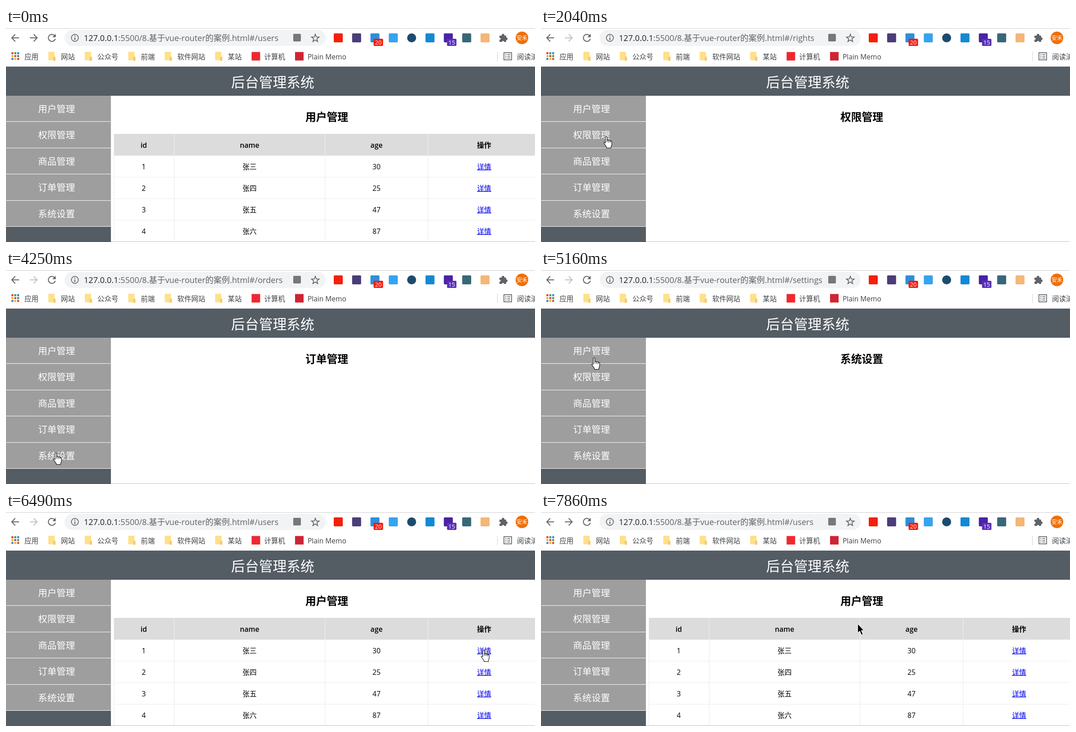
Recreate the animation shown at these times as an HTML page. Size 1175 px wide and 477 px high, loop 8 s.

```html
<!DOCTYPE html>
<html lang="zh-CN">
<head>
<meta charset="utf-8">
<title>后台管理系统</title>
<style>
  html, body { margin: 0; width: 100%; height: 100%; overflow: hidden; background: #fff; }
  svg { display: block; font-family: "Open Sans", "Noto Sans CJK SC", "Noto Sans CJK", sans-serif; }
  .mid { text-anchor: middle; }
  .ui { fill: none; stroke: #5f6368; stroke-width: 2; }
  .thin { stroke-width: 1.7; }
</style>
</head>
<body>
<svg id="stage" width="1175" height="477" viewBox="0 0 1175 477"></svg>
<script>
const LOOP = 8000, STEP = 70;
const menu = [['users', '用户管理'], ['rights', '权限管理'], ['goods', '商品管理'],
              ['orders', '订单管理'], ['settings', '系统设置']];

const rect = (x, y, w, h, fill, more = '') =>
  `<rect x="${x}" y="${y}" width="${w}" height="${h}" fill="${fill}" ${more}/>`;
const disc = (x, y, r, more) => `<circle cx="${x}" cy="${y}" r="${r}" ${more}/>`;
const text = (x, y, size, fill, str, more = '') =>
  `<text x="${x}" y="${y}" font-size="${size}" fill="${fill}" ${more}>${str}</text>`;
const mid = (x, y, size, fill, str, more = '') =>
  text(x, y, size, fill, str, `class="mid" ${more}`);
const path = (d, more = 'class="ui"') => `<path d="${d}" ${more}/>`;
const each = (n, fn) => Array.from({ length: n }, (_, i) => fn(i)).join('');

function starPath(cx, cy, outer, inner) {
  return 'M' + Array.from({ length: 10 }, (_, i) => {
    const r = i % 2 ? inner : outer, a = i * Math.PI / 5;
    return `${cx + r * Math.sin(a)} ${cy - r * Math.cos(a)}`;
  }).join('L') + 'Z';
}

function addressBar() {
  const back = path('M29 22H13M20.5 14L12.8 22L20.5 30');
  return rect(0, 0, 1175, 1, '#c8c8c8') + back +
    `<g id="forward" transform="matrix(-1 0 0 1 82 0)">${back}</g>` +
    path('M107.5 16.5A7.8 7.8 0 1 0 109.5 24') + path('M110.5 13V20.5H103Z', 'fill="#5f6368"') +
    rect(130, 4, 580, 36, '#f1f3f4', 'rx="18"') +
    disc(153, 22, 7.8, 'class="ui thin"') + path('M153 17v2M153 21v6') +
    text(173, 28.5, 18.1, '#5f6368', '<tspan fill="#202124">127.0.0.1</tspan>' +
      ':5500/8.基于vue-router的案例.html#/<tspan id="route"></tspan>') +
    rect(638, 13, 17, 17, '#75797d', 'rx="2"') +
    path(starPath(687, 23, 9, 3.8), 'class="ui thin"');
}

function extensions() {
  const colors = ['#f3200d', '#4b3c7a', '#2c8fda', '#36a3f0', '#1b4c6d',
                  '#1389d3', '#4a22a5', '#386878', '#f4b777'];
  const cx = i => 738 + i * 40.75;
  const badge = (i, fill, str) =>
    rect(cx(i) - 3, 24, 21, 16, fill, 'rx="2"') + mid(cx(i) + 7.5, 37, 13, '#fff', str);
  return colors.map((c, i) => rect(cx(i) - 10, 12, 20, 20, c, `rx="${i === 4 ? 10 : 2}"`)).join('') +
    badge(2, '#f31a0d', '20') + badge(6, '#5a30b8', '15') +
    rect(1096, 17, 15, 14, '#5f6368', 'rx="1"') + disc(1104, 16, 3, 'fill="#5f6368"') +
    disc(1111, 24, 3, 'fill="#5f6368"') + disc(1096.5, 24, 2.3, 'fill="#fff"') +
    disc(1104, 31, 2.3, 'fill="#fff"') +
    disc(1146, 22, 14, 'fill="#ee7009"') + mid(1146, 26.5, 12, '#fff', '安禾');
}

function bookmarks() {
  const size = 15.5, colors = ['#e34234', '#3b9d59', '#3f7fe8', '#eab51d'];
  const apps = x => each(9, i => rect(x - 1 + i % 3 * 6.4, 54 + (i / 3 | 0) * 6.4, 4.4, 4.4, colors[i % 4]));
  const folder = x => rect(x, 53, 14, 19, '#ffe08a', 'rx="1"') + rect(x + 11, 64, 5, 9, '#f5cc62', 'rx="1"');
  const block = fill => x => rect(x, 53.5, 19, 19, fill);
  const items = [['应用', apps], ['网站', folder], ['公众号', folder], ['前端', folder],
                 ['软件网站', folder], ['某站', folder], ['计算机', block('#ee2831')],
                 ['Plain Memo', block('#cf2434')]];
  let x = 13, s = '';
  for (const [label, icon] of items) {
    s += icon(x) + text(x + 28, 69.7, size, '#3c4043', label);
    x += 50 + size * label.length;
  }
  return s + rect(1091, 53, 1, 21, '#cdd0d4') + text(1135, 69.7, size, '#3c4043', '阅读清单') +
    rect(1106, 55, 17, 16, 'none', 'class="ui thin"') +
    each(3, i => path(`M1109 ${59 + i * 4}h2.5m2 0h6.5`, 'class="ui thin"'));
}

function layout() {
  const edge = i => Math.floor(150 + i * 58.5);
  return rect(0, 86, 1175, 65, '#545c64') + mid(592.5, 132, 30.8, '#fff', '后台管理系统') +
    rect(0, 151, 233, 326, '#545c64') +
    menu.map(([, name], i) =>
      rect(0, edge(i) + 1, 233, edge(i + 1) - edge(i) - 1, '#9e9e9e') +
      rect(0, edge(i + 1), 233, 1, '#fff') +
      mid(112.3, 187.5 + i * 58.6, 20.5, '#fff', name)).join('') +
    rect(233, 476, 942, 1, '#b9b9b9');
}

function table() {
  const cols = [306, 541, 823, 1062], size = 15.7;
  const rows = [[1, '张三', 30], [2, '张四', 25], [3, '张五', 47], [4, '张六', 87]];
  return rect(239, 236, 936, 48, '#dcdcdc') +
    each(4, i => rect(239, 284 + i * 48, 936, 1, '#ebebeb')) +
    [239, 373, 708, 937].map(x => rect(x, 236, 1.3, 240, '#ededed')).join('') +
    ['id', 'name', 'age', '操作'].map((str, i) =>
      mid(cols[i], 266.5, size, '#000', str, 'font-weight="600"')).join('') +
    rows.map((row, r) => [...row, '详情'].map((str, i) =>
      mid(cols[i], 314.5 + r * 48, size, i < 3 ? '#000' : '#0000ee', str,
        i < 3 ? '' : 'text-decoration="underline"')).join('')).join('');
}

function details() {
  return mid(712.5, 203, 18, '#000', '用户详情页--id:1---1', 'font-weight="700"') +
    rect(671.5, 235.5, 83, 38, '#ecf5ff', 'stroke="#8ecbf3"') + mid(713, 261, 15.6, '#222', '后退');
}

const arrow = path('M.5 .5V20.5L5 16.3L8.6 25L12 23.5L8.4 15H14.2Z', 'fill="#000" stroke="#fff"');
const hand = path('M4 2.5C4 .1 7.6 .1 7.6 2.5V9.5C8 8.3 11 8.5 11.2 10C12 9 14.6 9.4 14.8 11' +
  'C15.8 10.2 18.2 10.8 18.2 13V18.5C18.2 21 16.6 22.5 16.4 24.5V26.5H6.8V24.5' +
  'C5 22 2.6 18.5 .8 15.8C.3 13.8 2.5 13.2 4 15.2ZM7.6 9.5V13.5M11.2 10V14M14.8 11V14.5',
  'fill="#fff" stroke="#000" stroke-width="1.1"');

document.getElementById('stage').innerHTML =
  addressBar() + extensions() + bookmarks() + layout() +
  mid(712.5, 207, 23.8, '#000', '', 'id="heading" font-weight="700"') +
  `<g id="table">${table()}</g><g id="details">${details()}</g>` +
  `<g id="cursor"><g id="arrow" transform="translate(0 2)">${arrow}</g>` +
  `<g id="hand" transform="translate(-6 0)">${hand}</g></g>`;
const el = id => document.getElementById(id);
const show = (id, on) => el(id).setAttribute('visibility', on ? 'visible' : 'hidden');

// menu items are clicked in turn, then a detail link, then the back button
const FIRST_CLICK = 1780, CLICK_GAP = 900, DETAIL = 6500, BACK = 7720;

function pageAt(t) {
  if (t >= DETAIL && t < BACK) return ['useri…', ''];
  const clicks = Math.max(0, Math.floor((t - FIRST_CLICK) / CLICK_GAP) + 1);
  return menu[Math.min(clicks, menu.length) % menu.length];
}

// pointer glides: start, end, target x and y
const origin = [683, 398];
const glides = [
  [120, 750, 162, 195], [950, 1430, 145, 241], [2310, 2680, 100, 305], [3270, 3580, 101, 357],
  [3830, 4250, 111, 407], [4590, 5230, 118, 186], [5440, 5720, 831, 340],
  [5720, 6140, 1061, 307], [6830, 6970, 823, 282], [6970, 7460, 703, 247]
];
const ease = p => p * p * (3 - 2 * p);

function pointerAt(t) {
  let [x, y] = origin;
  for (const [from, to, tx, ty] of glides) {
    if (t < from) break;
    const held = Math.floor((t - from) / STEP) * STEP;
    const p = t >= to ? 1 : ease(held / (to - from));
    x += (tx - x) * p;
    y += (ty - y) * p;
  }
  return [Math.round(x), Math.round(y)];
}

function draw() {
  const t = performance.now() % LOOP;
  const [route, heading] = pageAt(t);
  const users = route === 'users';
  el('route').textContent = route;
  el('heading').textContent = heading;
  el('forward').setAttribute('opacity', t < FIRST_CLICK || t >= BACK ? 1 : 0.4);
  show('table', users);
  show('details', !heading);

  const [x, y] = pointerAt(t);
  const onMenu = x < 233 && y > 150 && y < 443;
  const onLink = users && Math.abs(x - 1062) < 17 && Math.abs(y - 308) < 10;
  const pointing = onMenu || onLink;
  el('cursor').setAttribute('transform', `translate(${x} ${y})`);
  show('arrow', t >= 120 && !pointing);
  show('hand', t >= 120 && pointing);
  requestAnimationFrame(draw);
}
draw();
</script>
</body>
</html>
```
